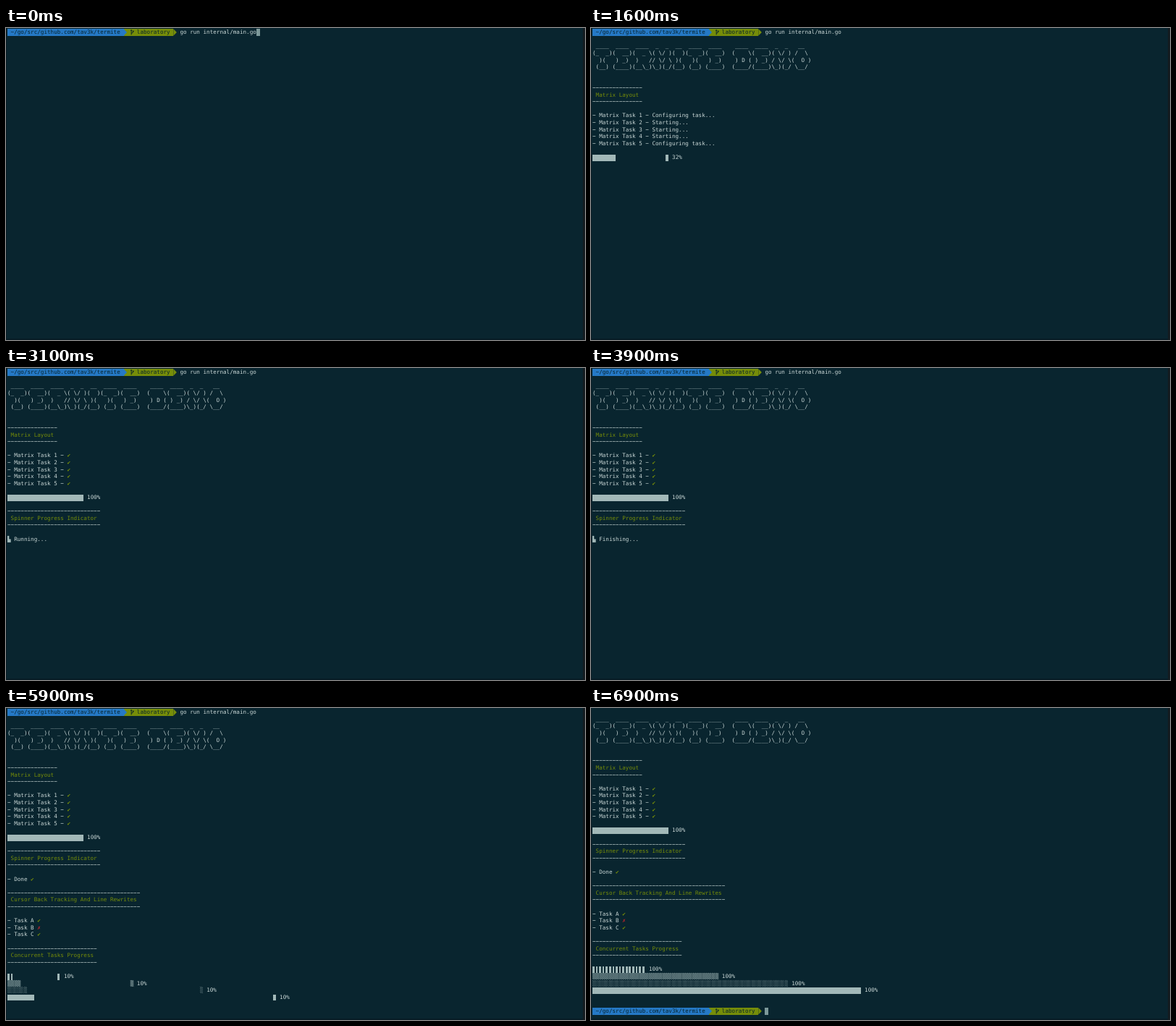
Animation, 800 px wide and 431 px high, one loop 7 s. Source, as an HTML page:

```html
<!DOCTYPE html>
<html lang="en">
<head>
<meta charset="utf-8">
<title>Terminal demo</title>
<style>
  :root { --w: 4.586px; --h: 9.6px; --bg: #09252f; --fg: #c9d7d6; --block: #a2b8b8; --blue: #2579c6; --green: #768d09; }
  html, body { margin: 0; width: 100%; height: 100%; overflow: hidden; background: var(--bg); }
  #stage { position: relative; width: 800px; height: 431px; overflow: hidden; background: var(--bg);
    box-shadow: inset 1px 0 #071a22, inset 0 -2px #071c25; }
  #stage::after { content: ""; position: absolute; right: 0; top: 0; width: 3px; height: 100%; background: #131b20; }
  #screen { position: absolute; left: 2px; top: 1.2px;
    font: 7.617px/9.6px "DejaVu Sans Mono", monospace; color: var(--fg);
    text-rendering: geometricPrecision; white-space: pre; font-variant-ligatures: none; }
  .row, .cell { position: absolute; height: var(--h); }
  .row { left: 0; top: calc(var(--r) * var(--h)); }
  .cell { top: 0; left: calc(var(--c) * var(--w)); width: calc(var(--n) * var(--w)); }
  .title, .ok { color: var(--green); }
  .bad { color: #d0242c; }
  .dark { color: #06222b; }
  .blue { background: var(--blue); }
  .green { background: var(--green); }
  .tip { clip-path: polygon(0 0, 100% 50%, 0 100%); }
  .cursor { background: #7c9899; }
  .solid, .half { top: .8px; height: 8.8px; background: var(--block); }
  .half { background: repeating-linear-gradient(90deg, var(--block) 0 2.7px, transparent 2.7px var(--w)); }
  .shade, .spin { color: var(--block); }
  .branch { fill: none; stroke: #06222b; stroke-width: .9; }
</style>
</head>
<body>
<div id="stage"><div id="screen"></div></div>
<script>
const LOOP = 7000, TICK = 100;
const screen = document.getElementById('screen');

const BANNER = [
  ' ____  ____  ____  _  _  __  ____  ____    ____  ____  _  _   __  ',
  '(_  _)(  __)(  _ \\( \\/ )(  )(_  _)(  __)  (    \\(  __)( \\/ ) /  \\ ',
  '  )(   ) _)  )   // \\/ \\ )(   )(   ) _)    ) D ( ) _) / \\/ \\(  O )',
  ' (__) (____)(__\\_)\\_)(_/(__) (__) (____)  (____/(____)\\_)(_/ \\__/ '
];
const STATUS = ['Starting...', 'Configuring task...', 'Running task...', 'Cleaning up...', 'Finishing...'];
// Times at which each matrix task moves on to its next status
const TASKS = [
  [1500, 1900, 2300, 2500, 2700],
  [1700, 2000, 2300, 2500, 2700],
  [1700, 1900, 2200, 2400, 2600],
  [1800, 2100, 2400, 2600, 2800],
  [1600, 2000, 2400, 2600, 2800]
];
const BARS = [[14, 'half'], [36, '▒'], [57, '░'], [79, 'solid']];

const OK = '<span class="ok">✔</span>', BAD = '<span class="bad">✗</span>';
const cell = (c, n, cls, html = '') =>
  `<div class="cell ${cls}" style="--c:${c};--n:${n}">${html}</div>`;
const clampPct = p => Math.max(0, Math.min(100, Math.round(p)));

function prompt(tail) {
  const branch = '<svg class="branch" width="5" height="9.6" viewBox="0 0 5 9.6">' +
    '<path d="M1.2 1.6V8.4M1.2 6.4Q3.8 6 3.8 3.6M.3 2.8L1.2 1.6L2.1 2.8M2.9 4.2L3.8 2.8L4.7 4.2"/></svg>';
  return cell(0, 35, 'blue dark', ' ~/go/src/github.com/tav3k/termite') +
    cell(35, 15, 'green dark', '    laboratory') +
    cell(35, 1, 'blue tip') + cell(37, 1, '', branch) +
    cell(50, 1, 'green tip') + tail;
}

function bar(inner, kind, pct) {
  const n = 1 + Math.floor(inner * pct / 100), end = inner + 1;
  const part = (c, len) => kind.length > 1
    ? cell(c, len, kind) : cell(c, len, 'shade', kind.repeat(len));
  return part(0, n) + part(end, 1) + cell(end + 2, 4, '', pct + '%');
}

function title(lines, row, text) {
  const rule = '−'.repeat(text.length + 2);
  lines[row] = lines[row + 2] = rule;
  lines[row + 1] = `<span class="title"> ${text}</span>`;
}

function build(t) {
  const lines = [];
  const command = cell(52, 23, '', 'go run internal/main.go');
  lines[0] = prompt(command + (t < 100 ? cell(75, 1, 'cursor') : ''));
  if (t >= 100 && t < 1000) lines[1] = cell(0, 1, 'cursor');

  if (t >= 1000) {
    BANNER.forEach((s, i) => lines[2 + i] = s);
    title(lines, 8, 'Matrix Layout');
    TASKS.forEach((times, i) => {
      const step = times.filter(x => t >= x).length;
      lines[12 + i] = `− Matrix Task ${i + 1} − ${STATUS[step] || OK}`;
    });
    lines[18] = bar(21, 'solid', clampPct(32 + (t - 1600) * .05625));
  }
  if (t >= 2900) {
    title(lines, 20, 'Spinner Progress Indicator');
    const spin = '▙▜'[(t / TICK + 1) % 2];
    lines[24] = t < 4900
      ? `<span class="spin">${spin}</span> ${t < 3900 ? 'Running...' : 'Finishing...'}`
      : `− Done ${OK}`;
  }
  if (t >= 5000) {
    title(lines, 26, 'Cursor Back Tracking And Line Rewrites');
    [OK, BAD, OK].forEach((mark, i) =>
      lines[30 + i] = `− Task ${'ABC'[i]} ${t < 5900 ? '' : mark}`);
  }
  if (t >= 5900) {
    title(lines, 34, 'Concurrent Tasks Progress');
    const pct = clampPct(85 + (t - 6200) * .25);
    BARS.forEach(([n, kind], i) => lines[38 + i] = bar(n, kind, pct));
  }
  if (t >= 6400) {
    lines[44] = prompt(cell(52, 1, 'cursor'));
    lines.shift();
  }
  return lines.map((s, r) => `<div class="row" style="--r:${r}">${s}</div>`).join('');
}

let shown = -1;
function frame() {
  const t = Math.floor(performance.now() % LOOP / TICK) * TICK;
  if (t !== shown) screen.innerHTML = build(shown = t);
  requestAnimationFrame(frame);
}
frame();
</script>
</body>
</html>
```
